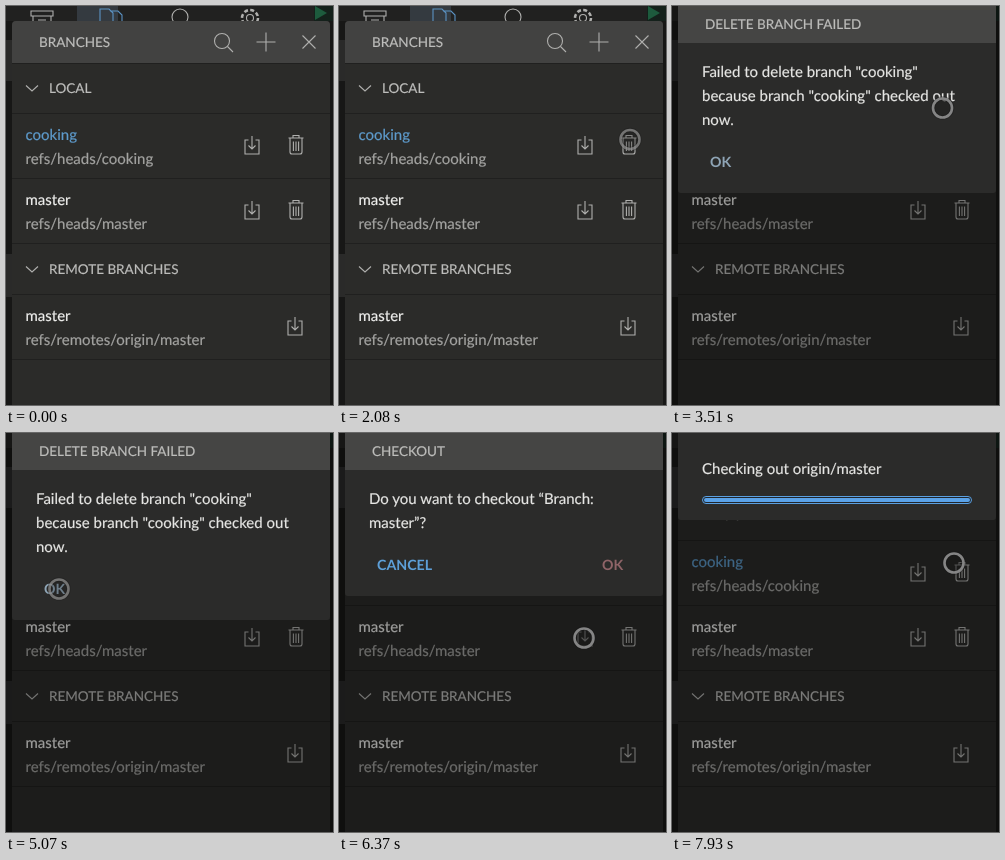
Animation, 327 px wide and 399 px high, one loop 8000 ms. Source, as an HTML page:

```html
<!DOCTYPE html>
<html lang="en">
<head>
<meta charset="utf-8">
<title>Branches</title>
<style>
html, body { margin: 0; width: 100%; height: 100%; overflow: hidden; background: #171716; }
svg { display: block; width: 100vw; height: 100vh; }
text {
  font: 15px Lato, "Open Sans", sans-serif; white-space: pre;
  text-rendering: geometricPrecision;
  fill: currentColor; stroke: currentColor; stroke-width: .2;
}
.head { font-size: 13.5px; color: #bdbdbb; }
.btn { font-size: 14.2px; font-weight: 700; stroke: none; }
.icon { fill: none; stroke: #b0b0ae; stroke-width: 1.1; }
.line { stroke: #20201f; }
</style>
</head>
<body>
<svg id="stage" viewBox="0 0 327 399" xmlns="http://www.w3.org/2000/svg"></svg>
<script>
const LOOP = 8000, STEP = 130;
const stage = document.getElementById('stage');

const rect = (x, y, w, h, fill, more = '') =>
  `<rect x="${x}" y="${y}" width="${w}" height="${h}" fill="${fill}" ${more}/>`;
const text = (x, y, str, color, cls = '') =>
  `<text x="${x}" y="${y}" class="${cls}" ${color ? `color="${color}"` : ''}>${str}</text>`;
const icon = (x, y, d, more = '') =>
  `<path class="icon" transform="translate(${x} ${y})" d="${d}" ${more}/>`;
const line = y => `<path class="line" d="M6 ${y + .5}H324"/>`;

const CHECKOUT = 'M-3.5-5.5H-7V8.5H7V-5.5H3.5M0-9.5V3.5M-3.5 0L0 3.5L3.5 0';
const TRASH = 'M-7.5-6.5H7.5M-3-6.5V-9H3V-6.5M-6-6.5V7.5Q-6 9.5-4 9.5H4Q6 9.5 6 7.5V-6.5M-2.6-3V6.5M0-3V6.5M2.6-3V6.5';
const CHEVRON = 'M-6-2.5L0 3L6-2.5';

const section = (y, name) => icon(26, y, CHEVRON) + text(43, y + 5, name, '', 'head');
const branch = (y, name, ref, color = '#efefed') =>
  text(19.5, y, name, color) + text(19.5, y + 24, ref, '#a3a3a1');

function toolbar() {
  return rect(0, 0, 327, 399, '#171716') +
    rect(0, 0, 327, 15, '#212120') + rect(71, 0, 41, 15, '#343a40') +
    rect(308, 0, 19, 15, '#14211b') +
    rect(0, 34, 6, 41, '#2a2a29') + rect(0, 248, 6, 43, '#2a2a29') +
    icon(36, 10, 'M-11-5H11V0H-11ZM-9 0V9M9 0V9M-4 4H4') +
    icon(105, 10, 'M-11-7H-2L2-3V9H-11ZM-1-5H7L11-1V9H2', 'style="stroke:#5b93c4"') +
    '<circle class="icon" cx="174" cy="11" r="8"/>' +
    '<circle class="icon" cx="244" cy="12" r="3.5"/>' +
    '<circle class="icon" cx="244" cy="12" r="8" style="stroke-width:2.5" stroke-dasharray="4 2.28"/>' +
    '<path d="M309 0L321 7L309 14Z" fill="#1d5b3d"/>';
}

function panel() {
  return rect(6, 15, 318, 390, '#2b2b29', 'rx="4"') +
    '<path d="M6 57V19Q6 15 10 15H320Q324 15 324 19V57Z" fill="#424241"/>' +
    [57, 107, 172, 237, 288, 353].map(line).join('') +
    text(33, 41, 'BRANCHES', '', 'head') +
    '<circle class="icon" cx="216" cy="35" r="7.5"/>' +
    icon(217, 36, 'M4.5 4.5L10 10') +
    icon(260, 36, 'M-9.5 0H9.5M0-9.5V9.5') +
    icon(303, 36, 'M-6.5-6.5L6.5 6.5M6.5-6.5L-6.5 6.5') +
    section(82, 'LOCAL') +
    branch(134, 'cooking', 'refs/heads/cooking', '#5e9bcc') +
    branch(199, 'master', 'refs/heads/master') +
    [139.5, 204.5].map(y => icon(246, y, CHECKOUT) + icon(290, y - 1, TRASH)).join('') +
    section(263, 'REMOTE BRANCHES') +
    branch(315, 'master', 'refs/remotes/origin/master') +
    icon(289, 320.5, CHECKOUT);
}

function dialog(id, height, title, lines, extra) {
  const first = title ? 71 : 41;
  return `<g id="${id}" display="none">` +
    rect(6, -5, 318, height + 5, '#2b2b2a', 'rx="3"') +
    (title ? rect(6, 0, 318, 37, '#454544') + text(33, 23, title, '', 'head') : '') +
    lines.map((s, i) => text(30, first + i * 24, s, '#e6e6e4')).join('') +
    extra + '</g>';
}
const cancel = y => text(38, y, 'CANCEL', '#5d9fd8', 'btn');
const ok = (x, y, color) => text(x, y, 'OK', color, 'btn');

stage.innerHTML = toolbar() + panel() +
  `<g id="dim">${rect(0, 0, 327, 399, '#000', 'opacity=".35"')}</g>` +
  dialog('ask', 139, 'DELETE BRANCH', ['Do you want to delete “Branch: cooking”?'],
    cancel(113) + ok(263, 113, '#7c7371')) +
  dialog('failed', 187, 'DELETE BRANCH FAILED',
    ['Failed to delete branch "cooking"', 'because branch "cooking" checked out', 'now.'],
    ok(38, 161, '#8fa5b6')) +
  dialog('checkout', 163, 'CHECKOUT', ['Do you want to checkout “Branch:', 'master”?'],
    cancel(137) + ok(263, 137, '#8f6468')) +
  dialog('progress', 87, '', ['Checking out origin/master'],
    rect(30.5, 63.5, 269, 7, '#20262c', 'rx="3.5" stroke="#5a9fe0"') +
    rect(32, 65, 266, 4, '#5aa2e8', 'rx="2"')) +
  `<g id="cursor"><circle r="9.5" fill="#161616" fill-opacity=".35" stroke="#1a1a1a" stroke-width="4.5" stroke-opacity=".4"/>
   <circle r="9.5" fill="none" stroke="#858585" stroke-width="2.6"/></g>`;

const $ = id => document.getElementById(id);

// Open dialogs: [id, from, to]
const dialogs = [
  ['ask', 2210, 3380], ['failed', 3510, 5200],
  ['checkout', 6370, 7540], ['progress', 7540, LOOP]
];
// Pointer stops: [time, x, y]
const stops = [
  [260, 342, 304], [1170, 290, 135], [1430, 291, 133.5], [2470, 291, 133.5],
  [3120, 270.5, 102], [4030, 270.5, 102], [4940, 53, 156], [5200, 53, 156],
  [5850, 245, 205], [6760, 245, 205], [7410, 274, 132], [7540, 274, 132],
  [7930, 282, 130]
];
const presses = [[1560, 2210], [5070, 5200], [5980, 6240], [7410, 7540]];
const within = (t, [a, b]) => t >= a && t < b;

function pointer(t) {
  const i = stops.findIndex(s => s[0] > t);
  if (i === 0) return stops[0].slice(1);
  if (i < 0) return stops[stops.length - 1].slice(1);
  const [t0, x0, y0] = stops[i - 1], [t1, x1, y1] = stops[i];
  const k = (1 - Math.cos(Math.PI * (t - t0) / (t1 - t0))) / 2;
  return [x0 + (x1 - x0) * k, y0 + (y1 - y0) * k];
}

function render(ms) {
  const t = Math.floor(ms % LOOP / STEP) * STEP;
  let open = false;
  for (const [id, ...span] of dialogs) {
    const on = within(t, span);
    open = open || on;
    $(id).setAttribute('display', on ? 'inline' : 'none');
  }
  $('dim').setAttribute('display', open ? 'inline' : 'none');
  $('cursor').setAttribute('transform', `translate(${pointer(t).join(' ')})`);
  $('cursor').setAttribute('opacity', presses.some(p => within(t, p)) ? .8 : 1);
}

const start = performance.now();
function tick() {
  render(performance.now() - start);
  requestAnimationFrame(tick);
}
tick();
</script>
</body>
</html>
```
